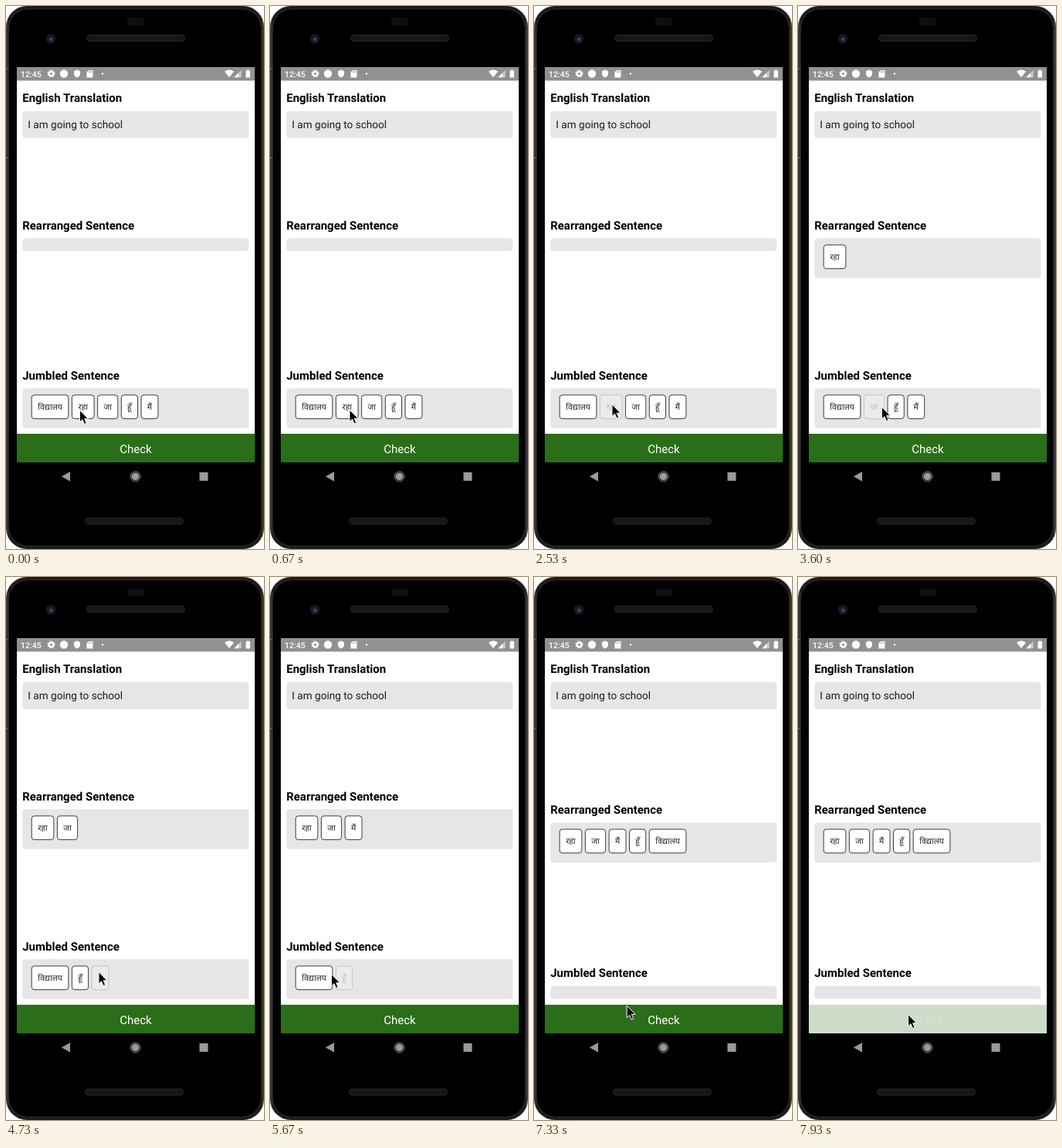
An HTML page for the animation above (8000 ms loop, 334 px wide and 702 px high).

```html
<!DOCTYPE html>
<html lang="en">
<head>
<meta charset="utf-8">
<title>Sentence builder</title>
<style>
  html, body { margin: 0; width: 334px; height: 702px; overflow: hidden; background: #fff; }
  svg { display: block; font-family: Roboto, sans-serif; text-rendering: geometricPrecision; }
  .title { font-size: 15px; font-weight: 700; }
  .box { fill: #e6e6e6; }
  .tile rect { fill: #fff; stroke: #111; stroke-width: .8; }
  .tile text { font: 10.5px "Noto Sans Devanagari", "Noto Sans", sans-serif; text-anchor: middle; fill: #222; }
</style>
</head>
<body>
<svg width="334" height="702" viewBox="0 0 334 702">
  <defs>
    <linearGradient id="edge">
      <stop offset="0" stop-color="#444"/>
      <stop offset=".012" stop-color="#1c1c1c"/>
      <stop offset=".988" stop-color="#1c1c1c"/>
      <stop offset="1" stop-color="#444"/>
    </linearGradient>
  </defs>

  <!-- phone -->
  <rect width="334" height="702" rx="27" fill="url(#edge)"/>
  <rect x="3.5" y="4" width="327" height="694" rx="25" stroke="#2a2a2a"/>
  <path d="M0 81h3M0 196h3" stroke="#777"/>
  <rect x="157" y="15" width="22" height="10" rx="3" fill="#0e0f12"/>
  <circle cx="58" cy="42.5" r="6.5" fill="#15171c"/>
  <circle cx="58.3" cy="43" r="2.6" fill="#3a4168"/>
  <rect x="104.5" y="37.5" width="127" height="8" rx="4" fill="#161616" stroke="#262626"/>
  <rect x="102.5" y="662" width="127" height="8" rx="4" fill="#161616" stroke="#262626"/>

  <!-- status bar -->
  <rect x="14" y="79" width="308" height="511" fill="#fff"/>
  <rect x="14" y="79" width="308" height="17.5" fill="#919191"/>
  <g fill="#fff">
    <text x="19" y="91.5" font-size="10.5" font-weight="500">12:45</text>
    <circle cx="58.5" cy="87.5" r="2.7" fill="none" stroke="#fff" stroke-width="2.2"/>
    <circle cx="58.5" cy="87.5" r="4.3" fill="none" stroke="#fff" stroke-width="1.4" stroke-dasharray="1.9 1.48"/>
    <circle cx="75" cy="87.5" r="5.2"/>
    <path d="M92 82.5l4 1.7v3q0 3.8-4 5.3q-4-1.5-4-5.3v-3z"/>
    <path d="M107 83h5.5v9.5h-8v-7z"/>
    <path d="M107.5 84.2v2M109.2 84.2v2M110.9 84.2v2" stroke="#919191" stroke-width=".8"/>
    <circle cx="125" cy="87.5" r="1.2"/>
    <path d="M283 84.8q6-4.6 12 0l-6 7.4z"/>
    <path d="M304.5 83v9.2h-9.2z" opacity=".55"/>
    <path d="M301 86.5v5.7h-5.7z"/>
    <path d="M310.5 83.5h1.5v-1h2.5v1h1.5v9h-5.5z"/>
  </g>

  <!-- navigation bar -->
  <g fill="#9b9b9b">
    <path d="M72 608.3l11-6.3v12.6z"/>
    <circle cx="167.5" cy="608.3" r="4.9"/>
    <circle cx="167.5" cy="608.3" r="6.3" fill="none" stroke="#9b9b9b" stroke-width=".9"/>
    <rect x="250.5" y="602.8" width="11" height="11"/>
  </g>

  <!-- app -->
  <text class="title" x="21.2" y="124.3">English Translation</text>
  <rect class="box" x="21.3" y="136" width="293" height="35" rx="4"/>
  <text x="28.3" y="158.3" font-size="13.6" fill="#1c1c1c">I am going to school</text>
  <g id="answer">
    <text class="title" x="21.2" y="5.3">Rearranged Sentence</text>
    <rect class="box" x="21.3" y="17" width="293" rx="4"/>
  </g>
  <g id="pool">
    <text class="title" x="21.2" y="5.3">Jumbled Sentence</text>
    <rect class="box" x="21.3" y="17" width="293" rx="4"/>
  </g>
  <g id="tiles"></g>
  <g id="check">
    <rect x="14" y="553" width="308" height="37" fill="#2b6e19"/>
    <text x="168" y="577.8" font-size="15" text-anchor="middle" fill="#fff">Check</text>
  </g>
  <path id="cursor" d="M0 0V15.500L3.500 12.200L6 18L8.700 16.900L6.200 11.200H11Z" fill="#000" stroke="#fff" stroke-linejoin="round"/>
</svg>

<script>
const LOOP = 8000;
const GAP = 3.7;
const $ = id => document.getElementById(id);

// Tiles in jumbled order; each fades when pressed and then moves up.
const tiles = [
  { word: 'विद्यालय', width: 48.5, press: 6130, move: 6470 },
  { word: 'रहा', width: 29.5, press: 2470, move: 2800 },
  { word: 'जा', width: 27, press: 3600, move: 3930 },
  { word: 'हूँ', width: 22, press: 5400, move: 5730 },
  { word: 'मैं', width: 22.7, press: 4470, move: 4870 },
];

// Cursor tip: time, x, y
const path = [
  [0, 95.5, 522.5], [70, 95.5, 522.5], [670, 103, 522], [1000, 103, 522],
  [1670, 112.5, 520.5], [2000, 112.5, 520.5], [2200, 101, 515],
  [2800, 101, 515], [3200, 108.5, 518.5], [3600, 108.5, 518.5], [4400, 120, 510.5],
  [4870, 120, 510.5], [5200, 95, 514], [5550, 95, 514], [5670, 79.5, 513.5],
  [6130, 57.5, 522.5], [6800, 57.5, 522.5], [7600, 142.5, 565.5], [LOOP, 142.5, 565.5],
];

for (const tile of tiles) {
  $('tiles').insertAdjacentHTML('beforeend',
    `<g class="tile"><rect x=".4" y=".4" width="${tile.width - 0.8}" height="30.7" rx="3.5"/>
     <text x="${tile.width / 2}" y="19.5">${tile.word}</text></g>`);
  tile.node = $('tiles').lastChild;
}

const place = (node, x, y) => node.setAttribute('transform', `translate(${x} ${y})`);

function layout(id, y, row, time) {
  place($(id), 0, y);
  $(id).querySelector('rect').setAttribute('height', row.length ? 51.5 : 16.5);
  let x = 32.8;
  for (const tile of row) {
    place(tile.node, x, y + 25.2);
    tile.node.setAttribute('opacity', time >= tile.press && time < tile.move ? 0.2 : 1);
    x += tile.width + GAP;
  }
}

function cursorAt(time) {
  const i = path.findIndex(key => key[0] > time);
  const [t0, x0, y0] = path[i - 1], [t1, x1, y1] = path[i];
  const u = (time - t0) / (t1 - t0), s = u * u * (3 - 2 * u);
  return [x0 + (x1 - x0) * s, y0 + (y1 - y0) * s];
}

function draw(now) {
  const time = now % LOOP;
  const moved = tiles.filter(t => time >= t.move).sort((a, b) => a.move - b.move);
  const left = tiles.filter(t => time < t.move);
  layout('answer', left.length ? 283.3 : 300.5, moved, time);
  layout('pool', left.length ? 477.3 : 512, left, time);

  const fade = 1 - 0.76 * Math.min(1, Math.max(0, (time - 7620) / 280));
  for (const part of $('check').children) part.setAttribute('opacity', fade);

  place($('cursor'), ...cursorAt(time));
  requestAnimationFrame(draw);
}
requestAnimationFrame(draw);
</script>
</body>
</html>
```
